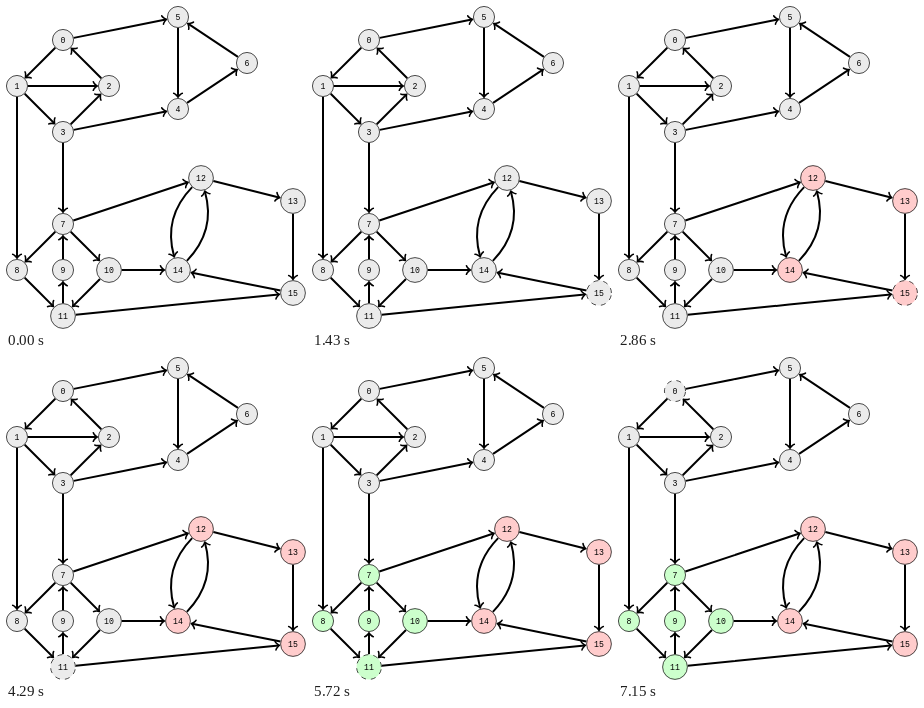
These frames come from a looping animation (300x323 px, 8000 ms). An HTML page:

```html
<!DOCTYPE html>
<html lang="en">
<head>
<meta charset="utf-8">
<title>Strongly connected components</title>
<style>
  html, body { margin: 0; width: 100%; height: 100%; overflow: hidden; background: #fff; }
  svg { display: block; width: 100%; height: 100%; }
  .edge { fill: none; stroke: #000; stroke-width: 2; }
  .head { fill: none; stroke: #000; stroke-width: 1.6; stroke-linecap: round; stroke-linejoin: round; }
  .node { stroke: #000; stroke-width: .7; }
  text { font: 8.2px "Liberation Mono", monospace; text-anchor: middle; }
</style>
</head>
<body>
<svg id="stage" viewBox="0 0 300 323"></svg>
<script>
const stage = document.getElementById("stage");
const GREY = "#ebebeb", PINK = "#ffcccc", GREEN = "#ccffcc";
const LOOP = 8000, STEP = 1430;

// Node centres in grid units of 23 px, offset by 11 px
const nodes = [
  [2, 1], [0, 3], [4, 3], [2, 5], [7, 4], [7, 0], [10, 2], [2, 9],
  [0, 11], [2, 11], [4, 11], [2, 13], [8, 7], [12, 8], [7, 11], [12, 12]
].map(([x, y], i) => ({ x: 11 + 23 * x, y: 11 + 23 * y, r: i < 10 ? 10.9 : 12.75 }));

const edges = "0-5 0-1 1-2 2-0 1-3 3-2 3-4 5-4 4-6 6-5 1-8 3-7 7-12 7-8 7-10 9-7 " +
  "8-11 11-9 10-11 10-14 11-15 12-13 13-15 15-14";
const bentEdges = "12-14 14-12";

const steps = [
  {},
  { active: 15 },
  { active: 15, pink: true },
  { active: 11, pink: true },
  { active: 11, pink: true, green: true },
  { active: 0, pink: true, green: true }
];

function add(tag, attributes) {
  const el = document.createElementNS("http://www.w3.org/2000/svg", tag);
  for (const name in attributes) el.setAttribute(name, attributes[name]);
  return stage.appendChild(el);
}

const polar = (p, angle, r) => ({ x: p.x + r * Math.cos(angle), y: p.y + r * Math.sin(angle) });

function drawEdge(from, to, bend) {
  const angle = Math.atan2(to.y - from.y, to.x - from.x);
  const outAngle = angle + bend, inAngle = angle + Math.PI - bend;
  const start = polar(from, outAngle, from.r);
  const end = polar(to, inAngle, to.r + 1.6);
  const reach = 0.3915 * Math.hypot(end.x - start.x, end.y - start.y);
  const c1 = polar(start, outAngle, reach), c2 = polar(end, inAngle, reach);
  add("path", {
    class: "edge",
    d: `M${start.x} ${start.y}C${c1.x} ${c1.y} ${c2.x} ${c2.y} ${end.x} ${end.y}`
  });
  add("path", {
    class: "head",
    d: "M-3.2 -4.3C-2.9 -2.7 0 -.3 .8 0C0 .3 -2.9 2.7 -3.2 4.3",
    transform: `translate(${end.x} ${end.y}) rotate(${inAngle * 180 / Math.PI + 180})`
  });
}

function drawEdges(list, bend) {
  for (const pair of list.split(" ")) {
    const [from, to] = pair.split("-").map(i => nodes[i]);
    drawEdge(from, to, bend);
  }
}

drawEdges(edges, 0);
drawEdges(bentEdges, Math.PI / 6);

// Mirrored vertically so that dashes run counter-clockwise
const circles = nodes.map(({ x, y, r }, i) => {
  const circle = add("circle", {
    class: "node", r: r - .35, transform: `translate(${x} ${y}) scale(1 -1)`
  });
  add("text", { x, y: y + 2.7 }).textContent = i;
  return circle;
});

let shown = -1;
function render(now) {
  const index = Math.floor(now % LOOP / STEP);
  if (index !== shown) {
    shown = index;
    const { active, pink, green } = steps[index];
    circles.forEach((circle, i) => {
      const fill = pink && i >= 12 ? PINK : green && i >= 7 && i < 12 ? GREEN : GREY;
      circle.setAttribute("fill", fill);
      circle.setAttribute("stroke-dasharray", i === active ? "5 5" : "none");
    });
  }
}

const startTime = performance.now();
function tick() {
  render(performance.now() - startTime);
  requestAnimationFrame(tick);
}
tick();
</script>
</body>
</html>
```
